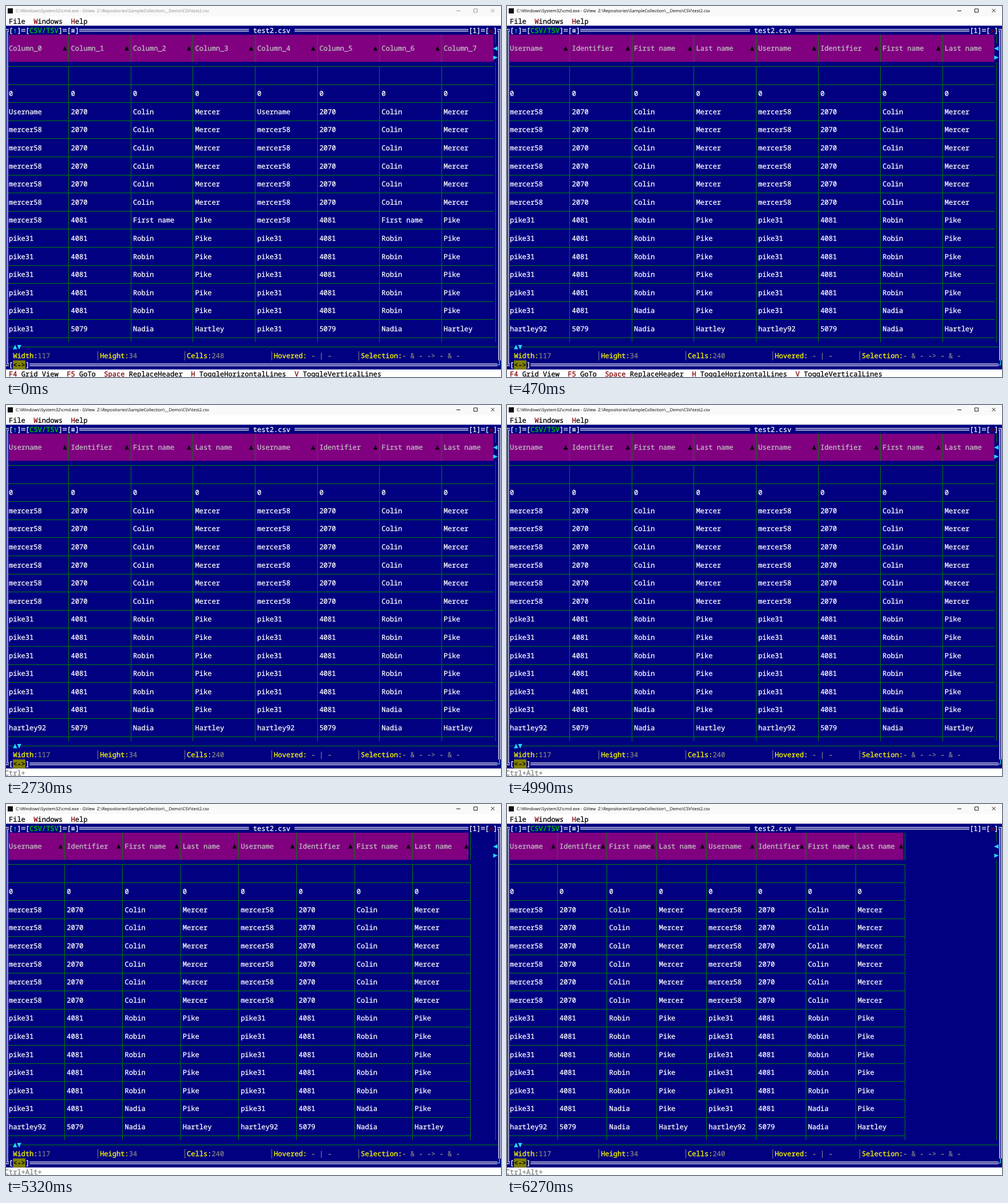
An HTML page that plays this animation: 865 by 648 pixels, repeating every 8 s.

```html
<!DOCTYPE html>
<html lang="en">
<head>
<meta charset="utf-8">
<title>Grid viewer</title>
<style>
  html, body { margin: 0; width: 100%; height: 100%; overflow: hidden; background: #fff; }
  svg { display: block; }
  text { white-space: pre; text-rendering: geometricPrecision; font: 12.06px "Noto Sans Mono", monospace; stroke-width: .3px; }
  text.title { font: 7.53px "Open Sans", sans-serif; }
  .crisp { shape-rendering: crispEdges; }
</style>
</head>
<body>
<svg id="stage" width="865" height="648" viewBox="0 0 865 648"></svg>
<script>
const LOOP = 8000;
const CELL_W = 7.236, CELL_H = 15.8;
const WHITE = '#fff', NAVY = '#000080', PURPLE = '#800080', GREEN = '#008000', RED = '#800000',
      GRAY = '#808080', SILVER = '#c0c0c0', YELLOW = '#ff0', CYAN = '#1fd8ff', BLACK = '#000';

// Terminal grid: left edge of a column, top edge of a row
const X = c => -2.3 + CELL_W * c;
const Y = r => 18.6 + CELL_H * r;
const esc = s => s.replace(/&/g, '&amp;').replace(/</g, '&lt;').replace(/>/g, '&gt;');

const text = (c, r, s, fill = WHITE) =>
  `<text x="${X(c).toFixed(2)}" y="${(Y(r) + 12.1).toFixed(2)}" fill="${fill}" stroke="${fill}">${esc(s)}</text>`;
const rect = (x, y, x2, y2, fill) =>
  `<rect x="${x}" y="${y}" width="${x2 - x}" height="${y2 - y}" fill="${fill}"/>`;
const path = (d, stroke, w) =>
  `<path d="${d}" fill="none" stroke="${stroke}" stroke-width="${w}"/>`;
const rule = (d, stroke) =>
  `<path class="crisp" d="${d}" fill="none" stroke="${stroke}"/>`;
const hLine = (x, x2, y) => `M${x} ${y}H${x2}`;
const vLine = (x, y, y2) => `M${x} ${y}V${y2}`;

// Solid arrow in the middle of a cell, turned by an angle
function arrow(c, r, angle, fill) {
  const x = X(c + .5), y = Y(r + .5) + .4;
  return `<path d="M0 -4.2L3.7 3.8H-3.7Z" fill="${fill}" transform="translate(${x} ${y}) rotate(${angle})"/>`;
}

function titleBar(active) {
  const ink = active ? BLACK : '#8c8c8c';
  return rect(0, 0, 865, 18, '#f9f9f9') + rect(3, 4, 12, 13, '#0c0c0c') +
    `<text class="title" x="17" y="11" fill="${ink}">C:\\Windows\\System32\\cmd.exe - GView  Z:\\Repositories\\SampleCollection\\__Demo\\CSV\\test2.csv</text>` +
    path('M787 8.5H794M817.5 5H823.5V11H817.5ZM847.5 5L853.5 11M853.5 5L847.5 11', ink, .9);
}

function menu() {
  return text(1, 0, 'File', BLACK) +
    text(7, 0, 'W', RED) + text(8, 0, 'indows', BLACK) +
    text(16, 0, 'H', RED) + text(17, 0, 'elp', BLACK);
}

function windowFrame() {
  const top = Y(1.5), bottom = Y(38.5), left = X(.5), right = X(119.5), g = 1.5;
  const double = (c1, c2, y) => hLine(X(c1), X(c2), y - g) + hLine(X(c1), X(c2), y + g);
  let d = '';
  for (const [a, b] of [[4, 5], [14, 15], [18, 59], [70, 112], [115, 116]]) d += double(a, b, top);
  d += double(6, 119, bottom);
  for (const s of [-g, g]) {
    d += `M${X(1)} ${top + s}H${left + s}V${bottom - s}H${X(1)}`;
    d += `M${X(119)} ${top + s}H${right - s}V${Y(38)}`;
  }
  return path(d, WHITE, 1.3) +
    path(`M${X(119)} ${bottom}H${right}V${Y(38)}`, CYAN, 1.3) +
    text(1, 1, '[') + text(2, 1, '↑', CYAN) + text(3, 1, ']') +
    text(5, 1, '[') + text(6, 1, 'CSV/TSV', '#00d800') + text(13, 1, ']') +
    text(15, 1, '[≡]') + text(60, 1, 'test2.csv') +
    text(112, 1, '[1]') + text(116, 1, '[') + text(117, 1, 'x', RED) + text(118, 1, ']') +
    rect(X(2), Y(38), X(5), Y(39), '#808000') +
    text(1, 38, '[') + text(2, 38, '<->', BLACK) + text(5, 38, ']');
}

function splitters() {
  const x = X(118.5), y = Y(36.5);
  return rule(hLine(X(1), X(2), y) + hLine(X(4), X(119), y) + vLine(x, Y(2), Y(3)) + vLine(x, Y(5), Y(36)), GREEN) +
    arrow(118, 3, -90, CYAN) + arrow(118, 4, 90, CYAN) +
    arrow(2, 36, 0, CYAN) + arrow(3, 36, 180, CYAN);
}

function statusBar(cells) {
  const items = [[2, 'Width:', '117'], [23, 'Height:', '34'], [44, 'Cells:', cells],
                 [65, 'Hovered:', ' - | -'], [86, 'Selection:', '- & - -> - & -']];
  return items.map(([c, label, value], i) =>
    (i ? rule(vLine(X(c - .5), Y(37), Y(38)), GRAY) : '') +
    text(c, 37, label, YELLOW) + text(c + label.length, 37, value, GRAY)).join('');
}

function commandBar(keys) {
  if (keys) return text(0, 39, keys, GRAY);
  const items = [[1, 'F4', 'Grid View'], [15, 'F5', 'GoTo'], [24, 'Space', 'ReplaceHeader'],
                 [45, 'H', 'ToggleHorizontalLines'], [70, 'V', 'ToggleVerticalLines']];
  return items.map(([c, key, label]) =>
    text(c, 39, key, RED) + text(c + key.length + 1, 39, label, BLACK)).join('');
}

// Table contents, four fields that appear twice
const HEAD = ['Username', 'Identifier', 'First name', 'Last name'];
const FIRST = ['mercer58', '2070', 'Colin', 'Mercer'];
const SECOND = ['pike31', '4081', 'Robin', 'Pike'];
const THIRD = ['hartley92', '5079', 'Nadia', 'Hartley'];
const times = (n, row) => Array(n).fill(row);
const ZERO = times(4, '0');
const RAW = [ZERO, ['Username', ...FIRST.slice(1)], ...times(5, FIRST),
             [FIRST[0], '4081', 'First name', SECOND[3]], ...times(5, SECOND),
             [SECOND[0], ...THIRD.slice(1)]];
const NAMED = [ZERO, ...times(6, FIRST), ...times(5, SECOND),
               ['pike31', '4081', 'Nadia', 'Pike'], THIRD];

function table(width, named) {
  const rows = named ? NAMED : RAW;
  const last = 118;
  const end = Math.min(8 * width, last);
  const right = end < last ? X(end + .5) : X(last);
  let lines = '', cells = '';
  for (let r = 5; r <= 35; r += 2) lines += hLine(X(1) - 1, right, Y(r + .5));
  for (let i = 0; i < 8; i++) {
    const c = 1 + i * width, edge = width * (i + 1);
    if (edge < last) {
      const x = X(edge + .5);
      lines += vLine(x, Y(2), Y(5)) + vLine(x, Y(5.5), Y(36));
      cells += arrow(edge - 1, 3, 0, BLACK);
    }
    cells += text(c, 3, named ? HEAD[i % 4] : 'Column_' + i, SILVER);
    rows.forEach((row, k) => cells += text(c, 8 + 2 * k, row[i % 4]));
  }
  return rect(X(1), Y(2), X(end), Y(5), PURPLE) + rule(lines, GREEN) + cells;
}

const stepAt = (t, steps) => steps.reduce((v, [at, next]) => t >= at ? next : v, null);
const KEYS = [[0, ''], [2730, 'Ctrl+'], [3070, ''], [3810, 'Ctrl+'], [4990, 'Ctrl+Alt+']];
const WIDTHS = [[0, 15], [5320, 14], [5850, 13], [6270, 12]];

const stage = document.getElementById('stage');
let shown = '';

function draw(t) {
  const active = t >= 140, named = t >= 470;
  const keys = stepAt(t, KEYS), width = stepAt(t, WIDTHS);
  const state = [active, named, keys, width].join();
  if (state === shown) return;
  shown = state;
  stage.innerHTML = rect(0, 0, 865, 648, WHITE) + titleBar(active) + menu() +
    rect(0, Y(1), 865, Y(39), NAVY) + table(width, named) + windowFrame() +
    splitters() + statusBar(named ? '240' : '248') + commandBar(keys);
}

const start = performance.now();
function tick(now) {
  draw(Math.max(0, now - start) % LOOP);
  requestAnimationFrame(tick);
}
draw(0);
requestAnimationFrame(tick);
</script>
</body>
</html>
```
